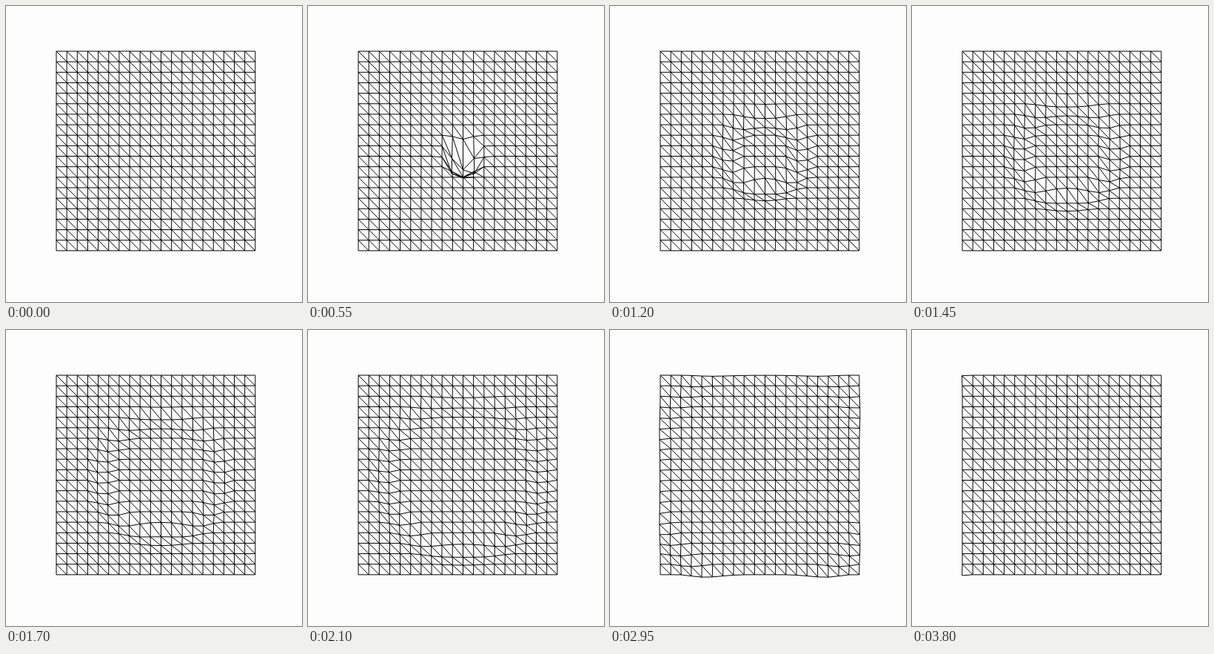
Animation of 400x399 px, one loop 3850 ms. Source, as an HTML page with a canvas:

```html
<!DOCTYPE html>
<html>
<head>
<meta charset="utf-8">
<style>
  html, body { margin: 0; height: 100%; overflow: hidden; background: #fdfdfd; }
  canvas { display: block; }
</style>
</head>
<body>
<canvas width="400" height="399"></canvas>
<script>
const ctx = document.querySelector('canvas').getContext('2d');
const LOOP = 3850, STEP = 50;
const COUNT = 20, CELL = 14.15, LEFT = 68, TOP = 61;
const CENTER = { x: 209.5, y: 198 };
const SPEED = 0.06, WIDTH = 44;

// A single pulse travels outward, pushing each node down and slightly outward.
function nodeAt(col, row, time) {
  const x = LEFT + col * CELL, y = TOP + row * CELL;
  const dx = x - CENTER.x, dy = y - CENTER.y;
  const r = Math.hypot(dx, dy);
  const phase = (SPEED * time - r) / WIDTH;
  if (phase <= 0 || phase >= 1) return [x, y];
  const pulse = Math.sin(Math.PI * phase) ** 2;
  const drop = Math.min(34, 370 / r);
  return [x + pulse * 1.2 * dx / r, y + pulse * (drop + 1.2 * dy / r)];
}

function draw(time) {
  const nodes = Array.from({ length: COUNT }, (_, row) =>
    Array.from({ length: COUNT }, (_, col) => nodeAt(col, row, time)));

  ctx.fillStyle = '#fdfdfd';
  ctx.fillRect(0, 0, 400, 399);
  ctx.beginPath();
  nodes.forEach((line, row) => line.forEach((from, col) => {
    for (const [right, down] of [[1, 0], [0, 1], [1, 1]]) {
      const to = nodes[row + down]?.[col + right];
      if (!to) continue;
      ctx.moveTo(...from);
      ctx.lineTo(...to);
    }
  }));
  ctx.strokeStyle = '#000';
  ctx.lineWidth = 1;
  ctx.stroke();
}

function tick() {
  const time = performance.now() % LOOP;
  draw(Math.floor(time / STEP) * STEP);
  requestAnimationFrame(tick);
}
tick();
</script>
</body>
</html>
```
